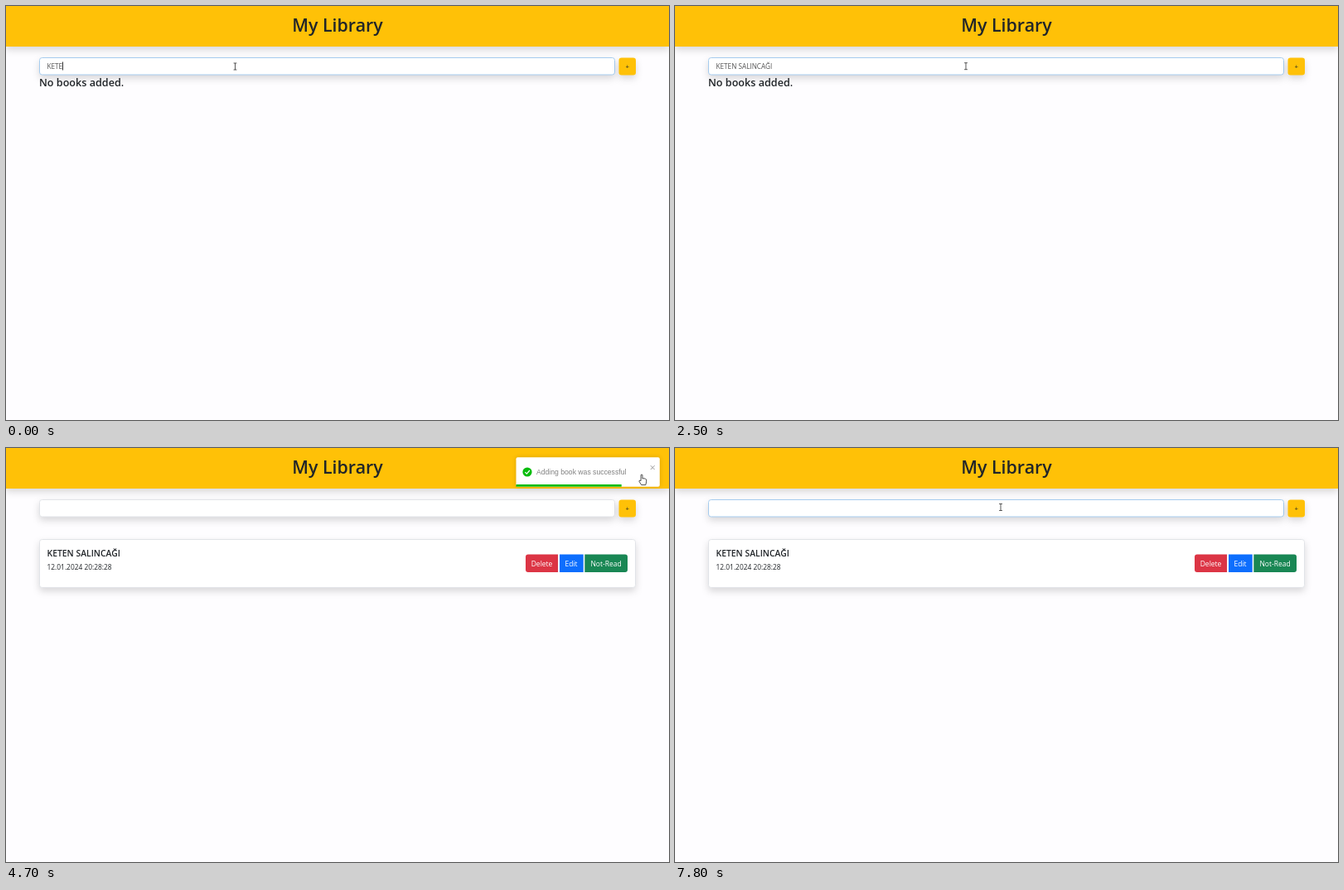
These frames come from a looping animation (800 px wide and 500 px high, 8000 ms). An HTML page:

```html
<!DOCTYPE html>
<html lang="en">
<head>
<meta charset="utf-8">
<title>My Library</title>
<style>
html, body { margin: 0; width: 100%; height: 100%; overflow: hidden; background: #fefdff; }
svg { display: block; font: 8.5px "Open Sans", "Noto Sans", sans-serif; fill: #212529; }
text { white-space: pre; }
.mid { text-anchor: middle; }
.bold { font-weight: 600; }
.shadow { filter: drop-shadow(0 4.3px 4.3px rgba(0,0,0,.15)); }
.box { fill: #fff; stroke: #e2e4e8; }
.white { fill: #fff; }
.pointer { fill: #fff; stroke: #222; stroke-width: .8; stroke-linejoin: round; }
.toastBox { fill: #fff; filter: drop-shadow(0 .5px 2.7px rgba(0,0,0,.16)); }
.toastText { font: 8.64px "Liberation Sans", Arial, sans-serif; fill: #808080; }
</style>
</head>
<body>
<svg width="800" height="500" viewBox="0 0 800 500">
  <rect class="shadow" width="800" height="49" fill="#ffc107"/>
  <text class="mid bold" x="400" y="31" font-size="21.4">My Library</text>

  <text id="empty" class="bold" x="40" y="96.7" font-size="12.6">No books added.</text>
  <g class="shadow">
    <rect id="field" class="box" x="40.5" y="62.5" width="694" height="20.5" rx="3"/>
  </g>
  <text id="typed" x="49.5" y="75.8" font-size="8.2" fill="#555"></text>
  <rect id="caret" y="67.5" width="1" height="10" fill="#333"/>
  <rect id="add" class="shadow" x="739.5" y="62.5" width="20.5" height="21" rx="3.2"/>
  <text class="mid" x="749.7" y="76" font-size="8">+</text>

  <g id="card">
    <rect class="box shadow" x="40.5" y="110.5" width="719" height="58" rx="3"/>
    <text id="book" class="bold" x="49.5" y="131" font-size="10.4"></text>
    <text x="49.5" y="147.2" font-size="8.4">12.01.2024 20:28:28</text>
    <path fill="#dc3545" d="M666 128.5V150H630a3 3 0 0 1-3-3V131.500a3 3 0 0 1 3-3Z"/>
    <path fill="#0d6efd" d="M668 128.500H696.700V150H668Z"/>
    <path fill="#198754" d="M698.300 128.500H747a3 3 0 0 1 3 3V147a3 3 0 0 1-3 3H698.300Z"/>
    <g class="mid white">
      <text x="646.500" y="142.500">Delete</text>
      <text x="682" y="142.500">Edit</text>
      <text x="724" y="142.500">Not-Read</text>
    </g>
  </g>

  <g id="toast">
    <rect class="toastBox" x="615.5" y="11.200" width="173.300" height="35.500" rx="2"/>
    <circle cx="629" cy="29" r="5.600" fill="#07bc0c"/>
    <path d="M626.300 29.200L628.300 31.200 631.900 27" fill="none" stroke="#fff" stroke-width="1.200"/>
    <text class="toastText" x="640" y="32">Adding book was successful</text>
    <path d="M777.800 21.200L782.600 26M782.600 21.200L777.800 26" stroke="#999"/>
    <rect id="bar" x="615.5" y="44" height="2.700" fill="#07bc0c"/>
  </g>

  <g id="cursor">
    <path id="arrow" class="pointer" d="M0 0V9.200L2.200 7.200 3.600 10.400 5 9.800 3.600 6.700H6.400Z"/>
    <path id="hand" class="pointer" d="M-.9 7.500V1a.9.900 0 0 1 1.900 0V5L2.800 4.700 4.400 5.200 5.700 6V9L4.800 12.600H-.3L-3 8.400Q-3.200 7-2 7.200Z"/>
    <path id="beam" d="M-1.900-4H1.900M0-4V4M-1.900 4H1.900" fill="none" stroke="#444" stroke-width=".9"/>
  </g>
</svg>
<script>
const LOOP = 8000, TITLE = "KETEN SALINCAĞI";
const ADDED = 3300, BLUR = 3100, FOCUS = 7200;
const ENTER = 3832, LEAVE = 5212, CLOSE = 6680;
const SCALE = .54;
const keyTimes = [200, 300, 600, 700, 800, 900, 1200, 1300, 1400, 1600, 1700];
// pointer moves: start, end, target x, target y
const moves = [
  [2300, 3100, 749, 71], [3500, 4050, 767, 32], [5050, 5650, 645, 109.5],
  [5700, 6750, 386, 84.5], [7080, 7240, 393, 71.5]
];

const $ = id => document.getElementById(id);
const set = (id, name, value) => $(id).setAttribute(name, value);
const show = (id, on) => set(id, "visibility", on ? "visible" : "hidden");
const clamp = u => Math.max(0, Math.min(1, u));
const smooth = u => u * u * (3 - 2 * u);
const within = (t, a, b) => t >= a && t < b;

function pointerAt(t) {
  let x = 276.5, y = 73;
  for (const [a, b, tx, ty] of moves) {
    const u = smooth(clamp((t - a) / (b - a)));
    x += (tx - x) * u;
    y += (ty - y) * u;
  }
  return [x, y];
}

// offset and opacity of the toast: bounces in from the right, then back out
function toastAt(t) {
  if (t < CLOSE) {
    const u = clamp((t - ADDED) / 700);
    const stops = [[0, 3000], [.6, -25], [.75, 10], [.9, -5], [1, 0]];
    const i = Math.max(1, stops.findIndex(s => u <= s[0]));
    const [u0, x0] = stops[i - 1], [u1, x1] = stops[i];
    const k = 1 - (1 - (u - u0) / (u1 - u0)) ** 3;
    return [(x0 + (x1 - x0) * k) * SCALE, i === 1 ? k : 1];
  }
  const u = clamp((t - CLOSE) / 700);
  if (u < .2) return [-20 * SCALE * smooth(u / .2), 1];
  const k = Math.sin((u - .2) / .8 * Math.PI / 2) ** 1.2;
  return [(-20 + 2020 * k) * SCALE, 1 - k];
}

function draw(t) {
  const added = t >= ADDED, toastOn = within(t, ADDED, CLOSE + 700);
  show("empty", !added);
  show("card", added);

  const count = 4 + keyTimes.filter(k => t >= k).length;
  $("typed").textContent = added ? "" : TITLE.slice(0, count);
  const width = added ? 0 : $("typed").getComputedTextLength();
  set("caret", "x", Math.round(49 + width));
  show("caret", t < 2300 || within(t, 2800, BLUR) || within(t, FOCUS, 7700));
  $("field").style.stroke = t < BLUR || t >= FOCUS ? "#a6ccef" : "";

  const [dx, alpha] = toastAt(t);
  show("toast", toastOn);
  set("toast", "transform", `translate(${dx} 0)`);
  set("toast", "opacity", alpha);
  // the countdown waits while the pointer rests on the toast
  const run = Math.min(t, ENTER) - ADDED + Math.max(0, t - LEAVE);
  set("bar", "width", 173.3 * clamp(1 - run / 2000));

  const [x, y] = pointerAt(t);
  const onAdd = x > 739 && within(y, 62, 84);
  const onToast = toastOn && within(x, 615, 789) && within(y, 11, 47);
  const onField = within(x, 40, 735) && within(y, 62, 83.5);
  set("add", "fill", onAdd ? "#ffca2c" : "#ffc107");
  set("cursor", "transform", `translate(${x} ${y})`);
  show("hand", onAdd || onToast);
  show("beam", onField);
  show("arrow", !onAdd && !onToast && !onField);
}

$("book").textContent = TITLE;
const start = performance.now();
function frame() {
  draw((performance.now() - start) % LOOP);
  requestAnimationFrame(frame);
}
frame();
</script>
</body>
</html>
```
